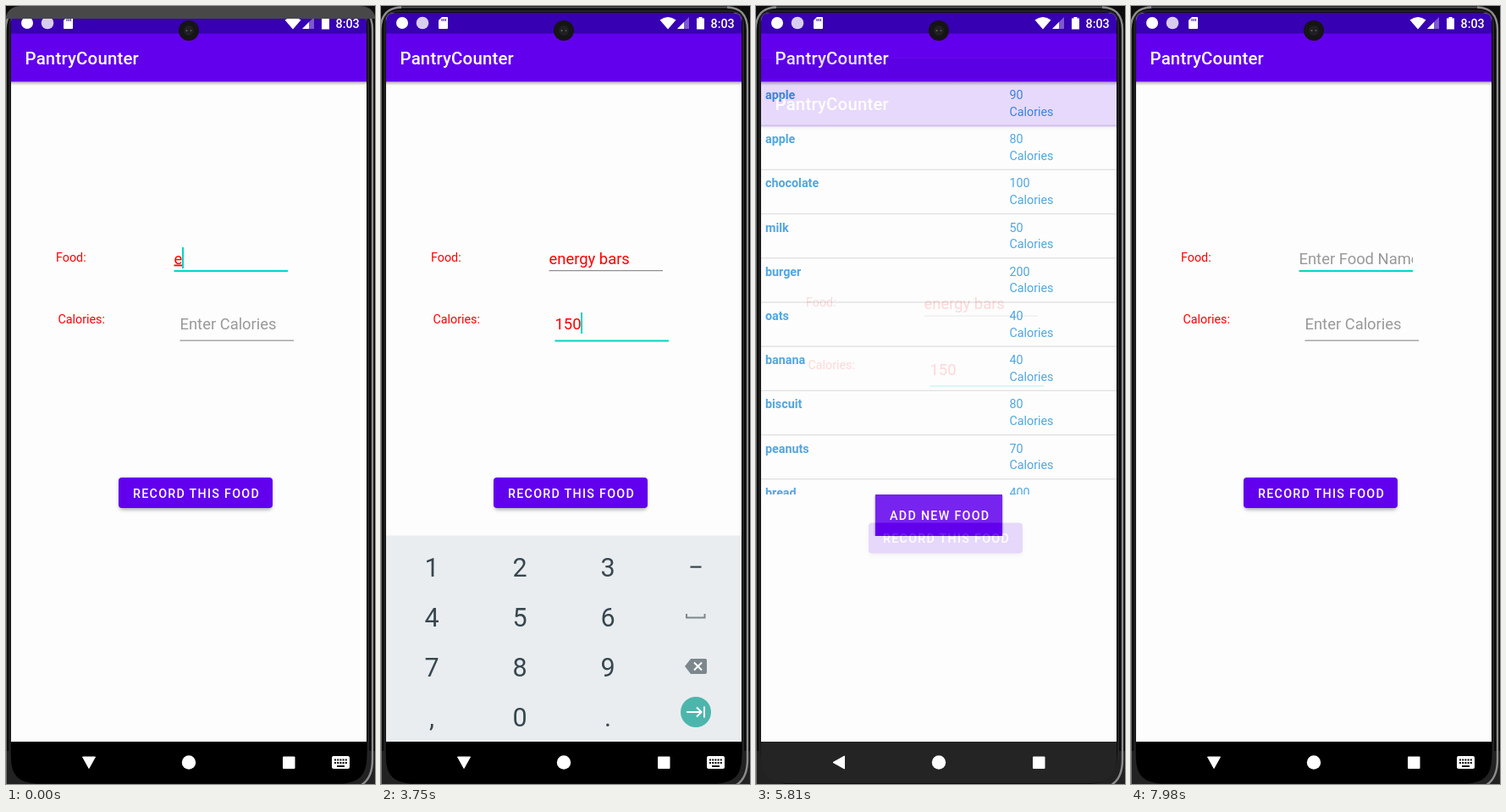
An HTML page for the animation above (8 s loop, 436 by 919 pixels).

```html
<!DOCTYPE html>
<html lang="en">
<head>
<meta charset="utf-8">
<title>Food log</title>
<style>
  html, body { margin: 0; width: 100%; height: 100%; overflow: hidden; background: #0c0c0c; }
  svg { display: block; width: 100vw; height: 100vh; }
  text { font-family: Roboto, sans-serif; font-size: 14.3px; white-space: pre; }
  .title { font-size: 20.4px; font-weight: 500; fill: #fff; letter-spacing: .2px; }
  .label { fill: #f00; }
  .field { font-size: 18.4px; }
  .caps { font-weight: 500; fill: #fff; letter-spacing: 1.28px; }
  .row { fill: #3498db; }
  .name { font-weight: 700; }
  .key { font-size: 27px; fill: #37474f; text-anchor: middle; }
  .digit { font-size: 30.5px; }
  .small { font-size: 18.4px; fill: #4f5b62; }
  .hint { font-size: 11px; font-weight: 700; fill: #7b868c; text-anchor: middle; }
  .icon { fill: #7c878d; }
  .line { fill: none; stroke: #fff; stroke-width: 2; }
</style>
</head>
<body>
<svg id="stage" viewBox="0 0 436 919" xmlns="http://www.w3.org/2000/svg">
  <defs>
    <clipPath id="screenClip"><path d="M6 18Q6 8 16 8H416Q426 8 426 18V889Q426 918 397 918H35Q6 918 6 889Z"/></clipPath>
    <clipPath id="contentClip"><rect x="6" y="90" width="420" height="779"/></clipPath>
    <clipPath id="listClip"><rect id="listBox" x="6" y="90" width="420" height="730"/></clipPath>
    <clipPath id="foodClip"><rect x="197" y="270" width="136" height="50"/></clipPath>
    <clipPath id="buttonClip"><rect x="133" y="557" width="182" height="36" rx="4"/></clipPath>
    <linearGradient id="fall" x2="0" y2="1">
      <stop stop-color="#000" stop-opacity=".28"/><stop offset="1" stop-color="#000" stop-opacity="0"/>
    </linearGradient>
    <filter id="soft" x="-20%" y="-50%" width="140%" height="220%"><feGaussianBlur stdDeviation="2"/></filter>
  </defs>

  <rect width="436" height="919" fill="#0c0c0c"/>
  <path d="M0 880V919H36Q6 916 5 880ZM436 880V919H397Q427 916 427 880Z" fill="#222"/>
  <path d="M20 1.500H412" stroke="#5b5b5b" stroke-width="1.500"/>
  <path d="M-.5 919V28Q0 2 24 1.500M409 1.500Q433 2 433 28V890Q433 912 420 920" fill="none" stroke="#8c8c8c" stroke-width="2.400"/>
  <path d="M4.500 890V22Q4.500 6 20 6H412Q428 6 428 22V890" fill="none" stroke="#242424" stroke-width="2"/>

  <g clip-path="url(#screenClip)">
    <rect x="6" y="8" width="420" height="911"/>
    <g id="listWindow"></g>
    <g id="formWindow"></g>
    <g clip-path="url(#contentClip)">
      <g id="keyboard"><g id="letters"></g><g id="numbers"></g></g>
    </g>
  </g>

  <g id="status" fill="#fff">
    <circle cx="25" cy="20" r="7"/>
    <circle cx="49" cy="20" r="7.3" fill="#d8cdf0"/>
    <path d="M72 13H78Q79 13 79 14V26Q79 27 78 27H69Q68 27 68 26V17Z"/>
    <path d="M72 15v3m2.2-3v3m2.2-3v3" stroke="#3700b3"/>
    <path d="M329.500 16.500Q339 9.500 348.500 16.500L339 27.500Z"/>
    <path d="M364 13V27H350Z" opacity=".35"/><path d="M358 19V27H350Z"/>
    <path d="M375.500 13h4v1.500h2.500V27.500H373V14.500h2.500Z"/>
    <text x="389.500" y="25.500" font-weight="500">8:03</text>
  </g>

  <g id="nav" fill="#fff">
    <path id="back" d="M90.500 887H105.500L98 900.500Z" stroke="#fff" stroke-linejoin="round"/>
    <circle cx="216" cy="893.500" r="8.200"/>
    <rect x="327" y="886.500" width="14.500" height="14.500" rx="1"/>
    <g id="keyIcon">
      <rect x="385" y="886" width="21" height="15" rx="2"/>
      <path d="M388 890.500H403M388 894H403" stroke="#000" stroke-width="2" stroke-dasharray="2 1.200"/>
      <path d="M391 898H400" stroke="#000" stroke-width="1.800"/>
    </g>
  </g>

  <path id="strip" d="M0 15V12Q4 0 18 0H418Q432 0 436 12V15Z" fill="#484848"/>
  <circle cx="216" cy="29" r="12" fill="#151515"/>
  <circle cx="216" cy="29" r="6" fill="#202024"/>
  <circle cx="213.500" cy="29" r="1" fill="#666"/><circle cx="218.500" cy="29" r="1" fill="#555"/>
  <path id="pointer" d="M0 0V16.500L4 13L6.700 19L9.500 17.700L6.800 12H12Z" fill="#fff" stroke="#111" stroke-width="1.200"/>
</svg>

<script>
const LOOP = 8000;
const TEAL = '#00d6c1', PURPLE = '#6200ee';
const $ = id => document.getElementById(id);
const set = (id, attrs) => { for (const k in attrs) $(id).setAttribute(k, attrs[k]); };
const show = (id, on) => set(id, { visibility: on ? 'visible' : 'hidden' });
const text = (x, y, cls, s, id = '') => `<text x="${x}" y="${y}" class="${cls}"${id && ` id="${id}"`}>${s}</text>`;
const rect = (x, y, w, h, fill, extra = '') => `<rect x="${x}" y="${y}" width="${w}" height="${h}" fill="${fill}" ${extra}/>`;

// Latest value in a list of [time, value] steps
const at = (steps, t) => steps.reduce((v, s) => s[0] <= t ? s[1] : v, steps[0][1]);

const appBar = rect(6, 8, 420, 861, '#fdfdfd') + rect(6, 89.5, 420, 4.5, 'url(#fall)') +
  rect(6, 8, 420, 25, '#3700b3') + rect(6, 32.5, 420, 57, PURPLE) + text(22.5, 69, 'title', 'PantryCounter');

function buildList() {
  const foods = 'apple 90,apple 80,chocolate 100,milk 50,burger 200,oats 40,banana 40,biscuit 80,peanuts 70,bread 400,donuts 300,apple 50,berries 50,tomatos 50';
  const rows = foods.split(',').map((food, i) => {
    const [name, amount] = food.split(' '), y = 52.2 * i;
    return text(11, 110 + y, 'row name', name) + text(299.5, 110 + y, 'row', amount) +
      text(299.5, 129.5 + y, 'row', 'Calories') + rect(6, 140.5 + y, 420, 1.3, '#dcdcdc');
  }).join('');
  $('listWindow').innerHTML = `${appBar}<g clip-path="url(#listClip)">${rows}</g>
    <g id="add">${rect(139.5, 2, 153, 47, '#000', 'opacity=".18"')}${rect(141, 0, 150, 49, PURPLE)}
    ${rect(141, 0, 150, 49, '#fff', 'id="addPress" opacity=".15"')}${text(158, 30, 'caps', 'ADD NEW FOOD')}</g>`;
}

function buildForm() {
  $('formWindow').innerHTML = appBar +
    text(59, 301.5, 'label', 'Food:') + text(61.5, 375, 'label', 'Calories:') +
    `<g clip-path="url(#foodClip)">${text(198.5, 304.5, 'field', '', 'food')}</g>` +
    text(205.5, 382, 'field', '', 'calories') +
    rect(198.5, 312, 134.5, 2, TEAL, 'id="foodLine"') + rect(205.5, 394.5, 134.5, 2, TEAL, 'id="calLine"') +
    rect(0, 0, 2, 25, TEAL, 'id="caret"') +
    rect(134, 559, 180, 36, '#000', 'id="shadow" rx="4" filter="url(#soft)"') +
    rect(133, 557, 182, 36, PURPLE, 'rx="4"') +
    `<g clip-path="url(#buttonClip)">${rect(133, 557, 182, 36, '#fff', 'id="press" opacity=".12"')}
    <circle id="ripple" fill="#fff" opacity=".2"/></g>` +
    text(150, 580.5, 'caps', 'RECORD THIS FOOD');
}

const backspace = (x, y) => `<g transform="translate(${x} ${y})"><path class="icon" d="M-13 0L-6 -9H11Q13 -9 13 -7V7Q13 9 11 9H-6Z"/>
  <path class="line" d="M-2 -4.500L7 4.500M7 -4.500L-2 4.500"/></g>`;
const enter = (x, y, id = '') => `<g transform="translate(${x} ${y})"><circle r="18" fill="#4db6ac"${id && ` id="${id}"`}/>
  <path class="line" d="M-11 0H6M1 -5.500L6.500 0L1 5.500M10 -6.500V6.500"/></g>`;

function buildKeyboards() {
  const keyRow = (keys, x, y) => [...keys].map((k, i) => text(x + 41.55 * i, y, 'key', k)).join('');
  const hints = [...'1234567890'].map((d, i) => text(43.5 + 41.5 * i, 644, 'hint', d)).join('');
  const words = [98, 215, 331].map((x, i) => text(x, 610.5, 'key small', '', 'word' + i)).join('');
  $('letters').innerHTML = rect(6, 581, 420, 45, '#e3e5e6') + rect(6, 625.5, 420, 244, '#e9edf0') +
    `<path d="M6 591.500H15A11.700 11.700 0 0 1 15 615H6Z" fill="#fff"/>
    <path d="M13 598L18.500 603.500L13 609" class="line" style="stroke:#444"/>` +
    words + rect(153.5, 591, 1, 25, '#bfc4c7') + rect(276.5, 591, 1, 25, '#bfc4c7') +
    `<rect x="403" y="595" width="6" height="11" rx="3" class="icon"/>
    <path d="M400 602.500Q400 609 406 609T412 602.500M406 609V613" fill="none" stroke="#7c878d" stroke-width="1.700"/>` +
    hints + keyRow('qwertyuiop', 28.8, 666) + keyRow('asdfghjkl', 49.2, 725) + keyRow('zxcvbnm', 90.5, 784) +
    `<path class="icon" d="M39 764.500L51 777H45V784H33V777H27ZM34 790H44.500V791.500H34Z"/>` + backspace(393, 774) +
    text(39, 840, 'key small', '?123') + text(90.5, 841, 'key', ',') + text(340, 841, 'key', '.') +
    `<circle cx="132" cy="833" r="9.500" fill="none" stroke="#7c878d" stroke-width="2"/>
    <path d="M127.500 835Q132 841.500 136.500 835Z" class="icon"/>
    <circle cx="129" cy="830.500" r="1.500" class="icon"/><circle cx="135" cy="830.500" r="1.500" class="icon"/>` +
    rect(163, 820.5, 147, 26.5, '#c8cccf', 'rx="3"') + enter(393, 834, 'enterKey');

  const pad = ['123', '456', '789', ',0.'].map((keys, r) =>
    [...keys].map((k, c) => text(60 + 104 * c, 673.5 + 59 * r, 'key digit', k)).join('')).join('');
  $('numbers').innerHTML = rect(6, 625.5, 420, 244, '#e9edf0') + pad + rect(365.5, 661.5, 13, 2.2, '#37474f') +
    `<path d="M361 718V722.500H382.500V718" class="line" style="stroke:#7c878d"/>` + backspace(372, 780) + enter(372, 834);
}

const food = [[0, 'e'], [260, 'en'], [390, 'ene'], [530, 'ener'], [800, 'energ'], [930, 'energy'], [1070, 'energy '],
  [1340, 'energy b'], [1480, 'energy ba'], [1620, 'energy bar'], [1760, 'energy bars'], [6080, '']];
const calories = [[0, ''], [2950, '1'], [3560, '15'], [3750, '150'], [6080, '']];
const suggestions = [[0, 'e and even'], [260, 'en end enough'], [390, 'ene energy enemy'], [530, 'ener energy energies'],
  [800, 'energ energy energies'], [930, 'energy energy’s energies'], [1070, 'and to for'], [1340, 'b but be'],
  [1480, 'ba back bad'], [1620, 'bar bars bar’s'], [1760, 'bars Barstow barstool']];
const caretOn = [[0, 1], [2260, 0], [2450, 1], [3380, 0], [3560, 1], [4280, 0], [4780, 1], [5270, 0]];
const pointer = [[0, null], [4400, [341, 594]], [4520, [318, 590]], [4650, [282, 586]], [4780, [256, 585]], [5390, null],
  [6480, [213, 807]], [6600, [216, 839]], [6880, null]];
// Ripple: x, y, radius, opacity
const ripple = [[0, null], [4900, [245, 578, 8, .2]], [5030, [235, 572, 18, .2]], [5150, [229, 574, 50, .18]],
  [5270, [224, 575, 95, .14]], [5390, null]];
// Form window: vertical shift, opacity
const formPose = [[0, [0, 1]], [5390, [3, .96]], [5530, [16, .75]], [5670, [37, .42]], [5810, [53.5, .14]], [5950, [60, 0]],
  [7180, [53.5, .14]], [7320, [28, .5]], [7550, [6, .92]], [7700, [0, 1]]];
const keyboardDrop = [[0, 300], [120, 110], [260, 0], [5530, 110], [5670, 300]];

const pen = document.createElement('canvas').getContext('2d');
function textWidth(s) {
  pen.font = '18.4px Roboto, sans-serif';
  return pen.measureText(s).width;
}

function setField(id, value, hint, composing) {
  const cut = composing ? value.lastIndexOf(' ') + 1 : value.length;
  $(id).innerHTML = value ? `${value.slice(0, cut)}<tspan text-decoration="underline">${value.slice(cut)}</tspan>` : hint;
  set(id, { fill: value ? '#f00' : '#999' });
}

function render(t) {
  const foodText = at(food, t), calText = at(calories, t);
  const onCalories = t >= 2450 && t < 6080;
  setField('food', foodText, 'Enter Food Name', t < 2330);
  setField('calories', calText, 'Enter Calories', false);
  set('foodLine', { fill: onCalories ? '#8c8c8c' : TEAL, height: onCalories ? 1.2 : 2 });
  set('calLine', { fill: onCalories ? TEAL : '#999', height: onCalories ? 2 : 1.3 });
  set('caret', onCalories
    ? { x: Math.floor(205.5 + textWidth(calText)), y: 362 }
    : { x: Math.floor(198.5 + textWidth(foodText)), y: 285 });
  show('caret', at(caretOn, t));

  const [shift, alpha] = at(formPose, t);
  set('formWindow', { transform: `translate(0 ${shift})`, opacity: alpha });

  const spot = at(ripple, t);
  show('ripple', spot);
  show('press', spot);
  if (spot) set('ripple', { cx: spot[0], cy: spot[1], r: spot[2], opacity: spot[3] });
  set('shadow', { opacity: spot ? .27 : .33, y: spot ? 562 : 559 });

  const addTop = t < 6080 ? 577 : 820;
  set('add', { transform: `translate(0 ${addTop})` });
  set('listBox', { height: addTop - 90 });
  show('addPress', t >= 6880 && t < 7030);

  set('keyboard', { transform: `translate(0 ${at(keyboardDrop, t)})` });
  show('letters', t < 2570);
  show('numbers', t >= 2570);
  set('enterKey', { fill: t >= 2330 && t < 2450 ? '#3d938b' : '#4db6ac' });
  at(suggestions, t).split(' ').forEach((word, i) => { $('word' + i).textContent = word; });

  const typing = t < 5670 || t >= 7980;
  show('keyIcon', typing);
  set('back', { transform: typing ? '' : 'rotate(90 98 893.5)' });
  set('strip', { opacity: Math.max(0, 1 - t / 2030) });

  const tip = at(pointer, t);
  show('pointer', tip);
  if (tip) set('pointer', { transform: `translate(${tip})` });
}

buildList();
buildForm();
buildKeyboards();
const start = performance.now();
function tick() {
  render((performance.now() - start) % LOOP);
  requestAnimationFrame(tick);
}
tick();
</script>
</body>
</html>
```
